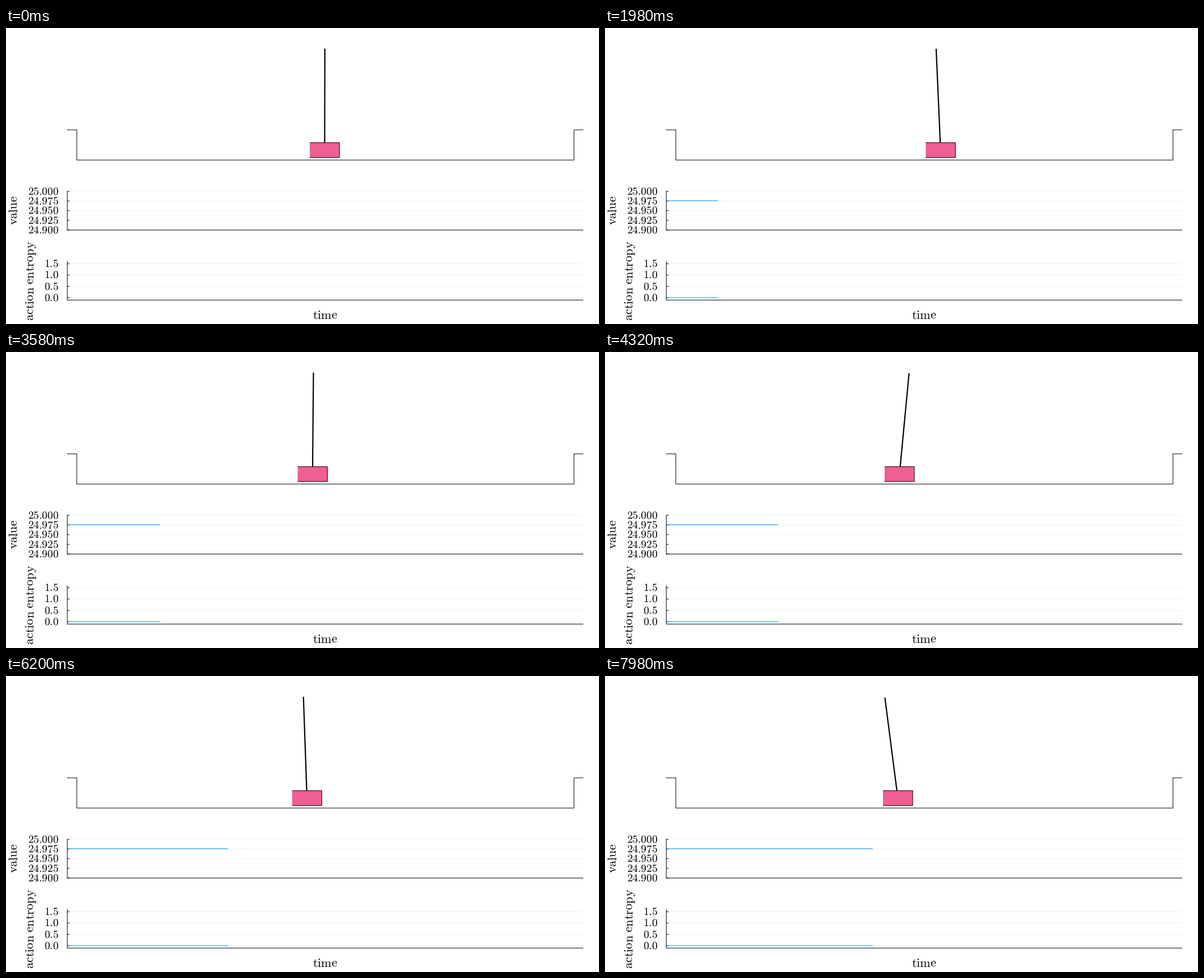
A matplotlib script for the animation above (8 s loop, 1058x529 px).

```python
import numpy as np
import matplotlib.pyplot as plt
from matplotlib.animation import FuncAnimation
from matplotlib.patches import Rectangle

W, H, DPI = 1058, 529, 64
PT = 72 / DPI            # points per pixel
FRAMES, STEP = 400, 20   # count, ms
LEFT, RIGHT = 109.3, 1030
ADVANCE = 0.921          # px the curves grow per frame
BLUE, PINK = "#1fa2f8", "#ef5f93"

CART_W, CART_TOP, CART_BOTTOM = 53, 204.9, 231.4
PIVOT_Y, POLE = 218.25, 181.25
GROWTH, FIRST_PUSH = 2.81, 1.62   # fall rate in 1/s, time in s

plt.rcParams["mathtext.fontset"] = "cm"
plt.rcParams["text.hinting"] = "none"
plt.rcParams["path.snap"] = False

# turning points: time in s, cart centre in px, pole angle in radians
TURNS = np.array([
    (FIRST_PUSH, 568.5, 0.102),
    (2.0, 599, -0.045),
    (2.64, 575.8, 0.0125),
    (3.58, 546.9, 0.009),
    (4.4, 525, 0.097),
    (4.68, 552, -0.02),
    (4.98, 520.4, -0.0655),
    (5.74, 538.5, 0),
    (6.2, 537, -0.035),
    (6.82, 576, -0.27),
    (7.5, 512, -0.135),
    (7.98, 522.5, -0.128),
])


def ease_through(kt, kv, t):
    """Smooth curve through the points that never overshoots them."""
    rate = np.diff(kv) / np.diff(kt)
    a, b = rate[:-1], rate[1:]
    slope = np.zeros(len(kt))
    same = a * b > 0
    slope[1:-1][same] = 2 * a[same] * b[same] / (a + b)[same]
    i = np.clip(np.searchsorted(kt, t, side="right") - 1, 0, len(kt) - 2)
    h = kt[i + 1] - kt[i]
    u = np.clip((t - kt[i]) / h, 0, 1)
    v = 1 - u
    return (v * v * ((1 + 2 * u) * kv[i] + u * h * slope[i])
            + u * u * ((1 + 2 * v) * kv[i + 1] - v * h * slope[i + 1]))


times = np.arange(FRAMES) * STEP / 1000
turn_t, turn_x, turn_angle = TURNS.T
cart_x = ease_through(turn_t, turn_x, times)
free_fall = turn_angle[0] * np.cosh(GROWTH * times) / np.cosh(GROWTH * FIRST_PUSH)
angle = np.where(times < FIRST_PUSH, free_fall,
                 ease_through(turn_t, turn_angle, times))

fig = plt.figure(figsize=(W / DPI, H / DPI), dpi=DPI, facecolor="white")
ax = fig.add_axes([0, 0, 1, 1])
ax.set_xlim(0, W)
ax.set_ylim(H, 0)
ax.axis("off")


def line(xs, ys, color="black", width=1.0, z=2):
    return ax.plot(xs, ys, color=color, lw=width * PT, zorder=z, snap=False,
                   solid_capstyle="butt", solid_joinstyle="miter")[0]


def label(x, y, words, size, ha="center", rotation=0):
    ax.text(x, y, r"$\mathrm{%s}$" % words.replace(" ", r"\ "),
            fontsize=size * PT, ha=ha, va="baseline",
            rotation=rotation, rotation_mode="anchor")


def chart(top, bottom, first, gap, values, digits):
    for i, value in enumerate(values):
        y = first + gap * i
        line([LEFT, RIGHT], [y, y], "#f1f1f1", z=1)
        line([LEFT, LEFT + 4], [y, y])
        label(94.4, y + 6.4, f"{value:.{digits}f}", 19.5, ha="right")
    line([LEFT, LEFT, RIGHT], [top, bottom, bottom])


# track with its two end walls
line([109, 126.3, 126.3, 1013.3, 1013.3, 1030], [182, 182, 236, 236, 182, 182])

chart(291.6, 361.1, 291.8, 17.33, np.linspace(25, 24.9, 5), 3)
chart(417, 486.2, 421.3, 20.23, np.linspace(1.5, 0, 4), 1)
label(20.4, 326, "value", 22.2, rotation=90)
label(50, 451.6, "action entropy", 22.3, rotation=90)
label(569.8, 520.9, "time", 22.3)

value_line = line([], [], BLUE, 1.2, z=4)
entropy_line = line([], [], BLUE, 1.2, z=4)
pole = line([], [], "black", 2.2, z=5)
cart = ax.add_patch(Rectangle((0, CART_TOP), CART_W, CART_BOTTOM - CART_TOP,
                              facecolor=PINK, lw=0, zorder=6, snap=False))
outline = line([], [], "black", 1.0, z=7)


def draw(n):
    x, a = cart_x[n], angle[n]
    west, east = x - CART_W / 2, x + CART_W / 2
    cart.set_x(west)
    outline.set_data([west, east, east, west],
                     [CART_TOP, CART_TOP, CART_BOTTOM, CART_BOTTOM])
    pole.set_data([x, x + POLE * np.sin(a)], [PIVOT_Y, PIVOT_Y - POLE * np.cos(a)])
    span = LEFT + ADVANCE * np.array([1, n + 1])
    value_line.set_data(span, [308.7, 308.7])
    entropy_line.set_data(span, [482, 482])
    return value_line, entropy_line, pole, cart, outline


anim = FuncAnimation(fig, draw, frames=FRAMES, interval=STEP,
                     repeat=True, repeat_delay=0, blit=False)
plt.show()
```
